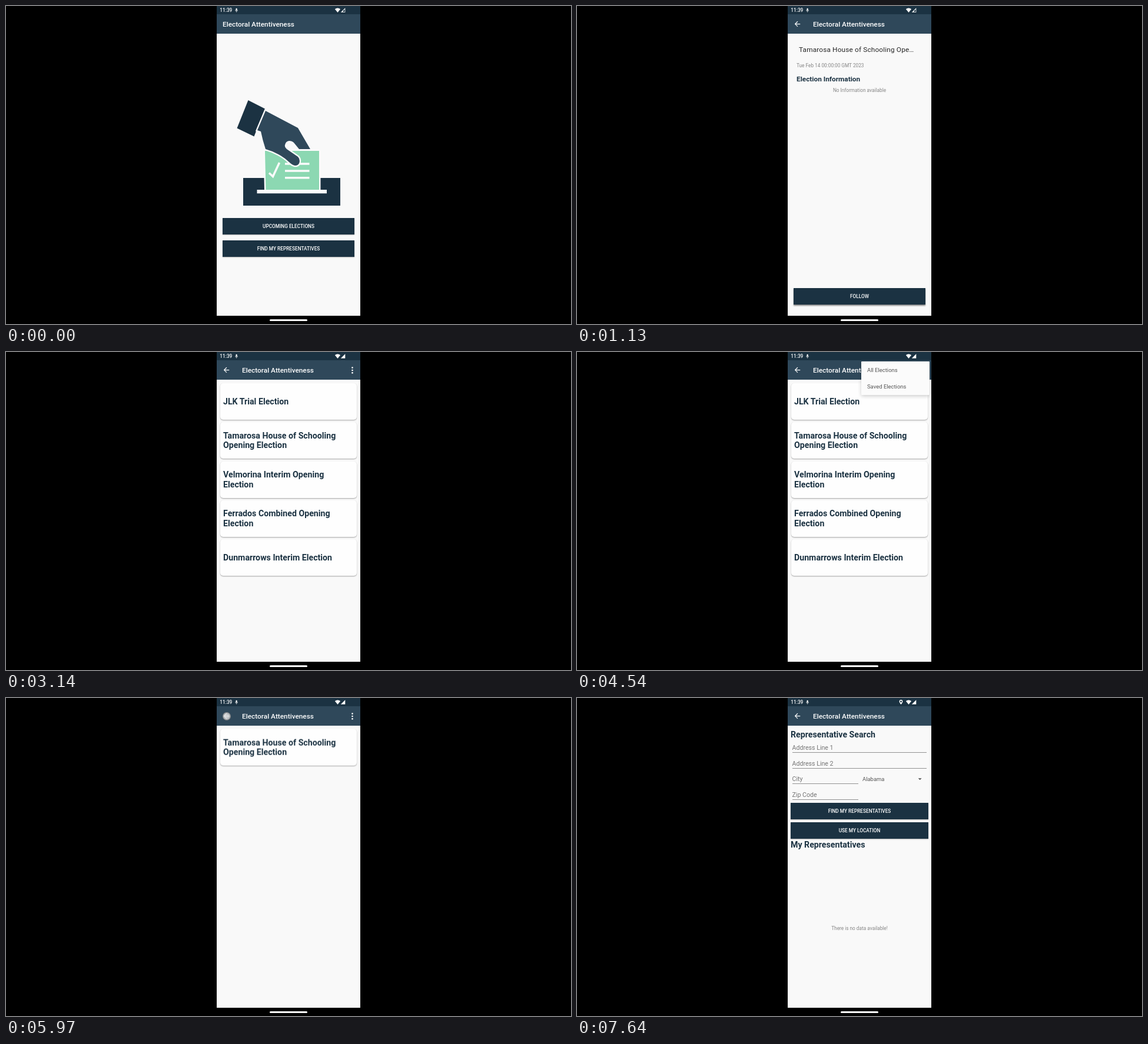
Animation of 960x540 px, one loop 8000 ms. Source, as an HTML page:

```html
<!DOCTYPE html>
<html lang="en">
<head>
<meta charset="utf-8">
<title>Voting app walkthrough</title>
<style>
:root {
  --paper: #f9f9f9;
  --navy: #1b3242;
  --slate: #2f485a;
  --loop: 8s;
}
html, body { margin: 0; width: 100%; height: 100%; overflow: hidden; background: #000; }
#stage {
  position: absolute; left: 0; top: 0; width: 960px; height: 540px; overflow: hidden;
  font-family: Roboto, "Noto Sans", sans-serif; background: #000;
}
#stage div, #stage svg { position: absolute; }
.screen { inset: 0; }
.bg { left: 358px; top: 0; width: 244px; height: 526px; background: var(--paper); }
.bar { left: 358px; width: 244px; }
.status { top: 0; height: 14px; background: var(--navy); }
.tool { top: 14px; height: 33px; background: var(--slate); }
.handle { left: 448px; top: 531.5px; width: 64px; height: 3px; border-radius: 2px; background: #fff; }
svg { left: 0; top: 0; }

/* text: --x left edge, --y middle line */
.t {
  left: calc(var(--x) * 1px); top: calc(var(--y) * 1px - 10px);
  line-height: 20px; white-space: nowrap; font-size: 8.27px; color: #868686;
}
.c { left: 358px; width: 244px; text-align: center; }
.title { font-size: 11.83px; font-weight: 500; color: #fff; --y: 31; }
.head { font-size: 14.19px; font-weight: 700; color: var(--navy); }
.hint { font-size: 10.64px; color: #757575; }
.menu { font-size: 9.46px; color: #555; }

.btn {
  left: 368px; width: 224px; height: 28px; line-height: 28px; overflow: hidden;
  background: var(--navy); color: #fff; font-size: 8.27px; font-weight: 500;
  text-align: center; box-shadow: 0 1px 1.5px rgba(0, 0, 0, .25);
}
.wide { left: 363px; width: 234px; }
.flat { left: 373px; width: 219px; height: 27.5px; background: #fefefe; color: #333; font-weight: 400; }
.raised { box-shadow: 0 1.5px 2px rgba(0, 0, 0, .45); }
.line { height: 1px; left: 366px; width: 228px; background: #929292; }
.half { width: 111.5px; }

.card {
  left: 364px; width: 227px; height: 62px; padding-left: 5px; border-radius: 5px;
  top: calc(53px + var(--i) * 66.35px);
  display: flex; align-items: center; line-height: 16.6px;
  font-size: 14.19px; font-weight: 700; color: var(--navy);
  background: #fefefe; box-shadow: 0 1px 2px rgba(0, 0, 0, .35);
  animation: card var(--loop) linear infinite;
}
.card.keep { animation: keep var(--loop) linear infinite; }
.popup {
  left: 483px; top: 16px; width: 116px; height: 57px; border-radius: 1px;
  background: #fbfbfb; box-shadow: 0 2px 6px rgba(0, 0, 0, .2);
  transform-origin: 100% 0; animation: popup var(--loop) linear infinite;
}

/* touches and ripples start at --at */
.tap, .ripple { animation: tap var(--loop) linear infinite; animation-delay: calc(var(--at) - var(--loop)); }
.tap {
  left: calc(var(--x) * 1px - 7px); top: calc(var(--y) * 1px - 7px);
  width: 12px; height: 12px; border: 1px solid rgba(120, 120, 120, .8); border-radius: 50%;
  background: radial-gradient(circle, rgba(225, 225, 225, .85) 40%, rgba(170, 170, 170, .75));
}
.ripple {
  left: calc(var(--rx) * 1px - 120px); top: -106px; width: 240px; height: 240px; border-radius: 50%;
  background: rgba(255, 255, 255, .2); animation-name: ripple;
}

/* hard switches */
.home { animation: home var(--loop) step-end infinite; }
.list { animation: list var(--loop) step-end infinite; }
.detail { animation: detail var(--loop) step-end infinite; }
.reps { animation: reps var(--loop) step-end infinite; }
.empty { animation: empty var(--loop) step-end infinite; }
.info { animation: info var(--loop) step-end infinite; }
.follow { animation: follow var(--loop) step-end infinite; }
.unfollow { animation: unfollow var(--loop) step-end infinite; }
.weak { animation: weak var(--loop) step-end infinite; }
.pin { animation: pin var(--loop) step-end infinite; }

@keyframes home { 0% { opacity: 1 } 2.5% { opacity: 0 } 74.875% { opacity: 1 } 85.375%, 100% { opacity: 0 } }
@keyframes list { 0% { opacity: 0 } 2.5% { opacity: 1 } 12.5% { opacity: 0 } 37.5% { opacity: 1 } 74.875%, 100% { opacity: 0 } }
@keyframes detail { 0% { opacity: 0 } 12.5% { opacity: 1 } 37.5%, 100% { opacity: 0 } }
@keyframes reps { 0% { opacity: 0 } 85.375%, 100% { opacity: 1 } }
@keyframes empty { 0% { opacity: 1 } 15.5%, 100% { opacity: 0 } }
@keyframes info { 0% { opacity: 0 } 15.5%, 100% { opacity: 1 } }
@keyframes follow { 0% { opacity: 1 } 24%, 100% { opacity: 0 } }
@keyframes unfollow { 0% { opacity: 0 } 24%, 100% { opacity: 1 } }
@keyframes weak { 0% { opacity: 1 } 37.5%, 100% { opacity: 0 } }
@keyframes pin { 0% { opacity: 0 } 93.25%, 100% { opacity: 1 } }

@keyframes card { 0%, 7% { opacity: 0 } 8.5%, 58.375% { opacity: 1 } 59.875%, 100% { opacity: 0 } }
@keyframes keep {
  0%, 7% { opacity: 0; transform: none }
  8.5% { opacity: 1 }
  59.875% { transform: none; animation-timing-function: ease-in-out }
  62.9%, 100% { opacity: 1; transform: translateY(-66.35px) }
}
@keyframes popup {
  0%, 50% { opacity: 0; transform: scale(.7) }
  52%, 58% { opacity: 1; transform: none }
  59.25%, 100% { opacity: 0; transform: none }
}
@keyframes tap { 0%, 1.4% { opacity: 1 } 1.7%, 100% { opacity: 0 } }
@keyframes ripple {
  0% { opacity: 0; transform: scale(.1) }
  .5% { opacity: 1 }
  2% { opacity: 1; transform: none }
  3.3%, 100% { opacity: 0; transform: none }
}
</style>
</head>
<body>
<div id="stage">
  <div class="bg"></div>
  <div class="bar tool"></div>

  <div class="screen home">
    <div class="t title" style="--x:368">Electoral Attentiveness</div>
    <svg width="960" height="540">
      <path fill="#1b3242" d="M403 292H568V339H403ZM411.5 160L440 174.5L421.5 221.5L392.5 207.5Z"/>
      <path fill="#8cd8b2" stroke="#fbfbfb" stroke-width="5" paint-order="stroke" d="M440 246H532V312H441.5Z"/>
      <path fill="#fbfbfb" d="M426.5 312H545V318.3H426.5Z"/>
      <path fill="none" stroke="#fbfbfb" stroke-width="3.5" d="M474 268H515.5M474 280H515.5M474 291.7H515.5M447 283.5L453.5 289.5L464.5 266"/>
      <path fill="#2f485a" stroke="#fbfbfb" stroke-width="4.6" paint-order="stroke" d="M441 178L496 207L517 243H498L489 232Q486 229 481 229Q475 230 474 236Q473 240 477 243L496 256Q500 260 498.5 266Q497 271 491 271Q486 270 481 265Q474 258 463 252Q452 246 441 243Q436 228 433 213L427 211Z"/>
    </svg>
    <div class="btn" style="top:360px">UPCOMING ELECTIONS<div class="ripple" style="--rx:104;--at:.06s"></div></div>
    <div class="btn" style="top:398px">FIND MY REPRESENTATIVES<div class="ripple" style="--rx:60;--at:6.74s"></div></div>
  </div>

  <div class="screen list">
    <div class="t title" style="--x:401">Electoral Attentiveness</div>
    <svg width="960" height="540" fill="#fff">
      <use href="#back"/>
      <circle cx="588.5" cy="26.6" r="1.3"/><circle cx="588.5" cy="31" r="1.3"/><circle cx="588.5" cy="35.4" r="1.3"/>
    </svg>
    <div class="card" style="--i:0">JLK Trial Election</div>
    <div class="card" style="--i:2">Velmorina Interim Opening<br>Election</div>
    <div class="card" style="--i:3">Ferrados Combined Opening<br>Election</div>
    <div class="card" style="--i:4">Dunmarrows Interim Election</div>
    <div class="card keep" style="--i:1">Tamarosa House of Schooling<br>Opening Election</div>
    <div class="popup">
      <div class="t menu" style="--x:10;--y:15">All Elections</div>
      <div class="t menu" style="--x:10;--y:43">Saved Elections</div>
    </div>
  </div>

  <div class="screen detail">
    <div class="t title" style="--x:401">Electoral Attentiveness</div>
    <svg width="960" height="540" fill="#fff"><use href="#back"/></svg>
    <div class="t" style="--x:377;--y:74;font-size:11.83px;letter-spacing:.15px;color:#262626">Tamarosa House of Schooling Ope…</div>
    <div class="t" style="--x:373;--y:101">Tue Feb 14 00:00:00 GMT 2023</div>
    <div class="t head" style="--x:373;--y:124;font-size:11.83px">Election Information</div>
    <div class="t c empty" style="--y:142.5">No Information available</div>
    <div class="screen info">
      <div class="btn flat" style="top:132.5px">VOTING LOCATION</div>
      <div class="btn flat" style="top:165.5px">BALLOT INFORMATION</div>
      <div class="t" style="--x:373;--y:210;font-size:10.64px;color:#5c5c5c">Correspondence Address</div>
      <div class="t" style="--x:373;--y:223">4170 E Quillon Row, Unit K31, Town Chancel Building</div>
      <div class="t" style="--x:373;--y:232.6">Tamarosa City, Tamarosa 00417</div>
    </div>
    <div class="btn raised" style="top:479px">
      <div class="screen follow">FOLLOW</div>
      <div class="screen unfollow">UNFOLLOW</div>
      <div class="ripple" style="--rx:112;--at:1.8s"></div>
    </div>
  </div>

  <div class="screen reps">
    <div class="t title" style="--x:401">Electoral Attentiveness</div>
    <svg width="960" height="540" fill="#fff">
      <use href="#back"/>
      <path fill="#555" d="M579.7 136.3H585.7L582.7 139.3Z"/>
    </svg>
    <div class="t head" style="--x:363;--y:62">Representative Search</div>
    <div class="t hint" style="--x:365.5;--y:85">Address Line 1</div>
    <div class="line" style="top:92px"></div>
    <div class="t hint" style="--x:365.5;--y:111.5">Address Line 2</div>
    <div class="line" style="top:119px"></div>
    <div class="t hint" style="--x:365.5;--y:138">City</div>
    <div class="line half" style="top:145px"></div>
    <div class="t menu" style="--x:485;--y:138">Alabama</div>
    <div class="t hint" style="--x:365.5;--y:164.5">Zip Code</div>
    <div class="line half" style="top:172px"></div>
    <div class="btn wide" style="top:178px">FIND MY REPRESENTATIVES</div>
    <div class="btn wide" style="top:210.5px">USE MY LOCATION<div class="ripple" style="--rx:110;--at:7.36s"></div></div>
    <div class="t head" style="--x:363;--y:249">My Representatives</div>
    <div class="t c" style="--y:390.5">There is no data available!</div>
  </div>

  <div class="bar status"></div>
  <div class="t" style="--x:363.3;--y:7.3;font-weight:500;color:#fff">11:39</div>
  <svg width="960" height="540" fill="#fff">
    <defs>
      <path id="back" transform="translate(367.4 23.5) scale(.591)" d="M20 11H7.83l5.59-5.59L12 4l-8 8 8 8 1.41-1.41L7.83 13H20v-2z"/>
    </defs>
    <rect x="390.5" y="3.8" width="2.2" height="4.2" rx="1.1"/>
    <path fill="none" stroke="#fff" stroke-width=".7" d="M389.6 6.8Q389.8 9 391.6 9Q393.4 9 393.6 6.8M391.6 9V10.6"/>
    <path d="M558.8 5.2Q563.5 1.6 568.2 5.2L563.5 11Z"/>
    <path d="M576.3 3.3V10.8H568.8Z"/>
    <path class="weak" fill="#1b3242" d="M575.5 5.4V10H573V7.9Z"/>
    <path class="pin" fill-rule="evenodd" d="M550.5 11Q547.6 7.6 547.6 6A2.9 2.9 0 0 1 553.4 6Q553.4 7.6 550.5 11ZM550.5 4.4A1.5 1.5 0 0 0 550.5 7.4A1.5 1.5 0 0 0 550.5 4.4Z"/>
  </svg>
  <div class="handle"></div>

  <div class="tap" style="--x:472;--y:375;--at:.03s"></div>
  <div class="tap" style="--x:462;--y:152;--at:.87s"></div>
  <div class="tap" style="--x:480;--y:494;--at:1.77s"></div>
  <div class="tap" style="--x:375;--y:31;--at:2.9s"></div>
  <div class="tap" style="--x:588;--y:31;--at:3.87s"></div>
  <div class="tap" style="--x:530;--y:60;--at:4.57s"></div>
  <div class="tap" style="--x:375;--y:31;--at:5.87s"></div>
  <div class="tap" style="--x:428.5;--y:412.5;--at:6.71s"></div>
  <div class="tap" style="--x:473;--y:225;--at:7.34s"></div>
</div>
</body>
</html>
```
